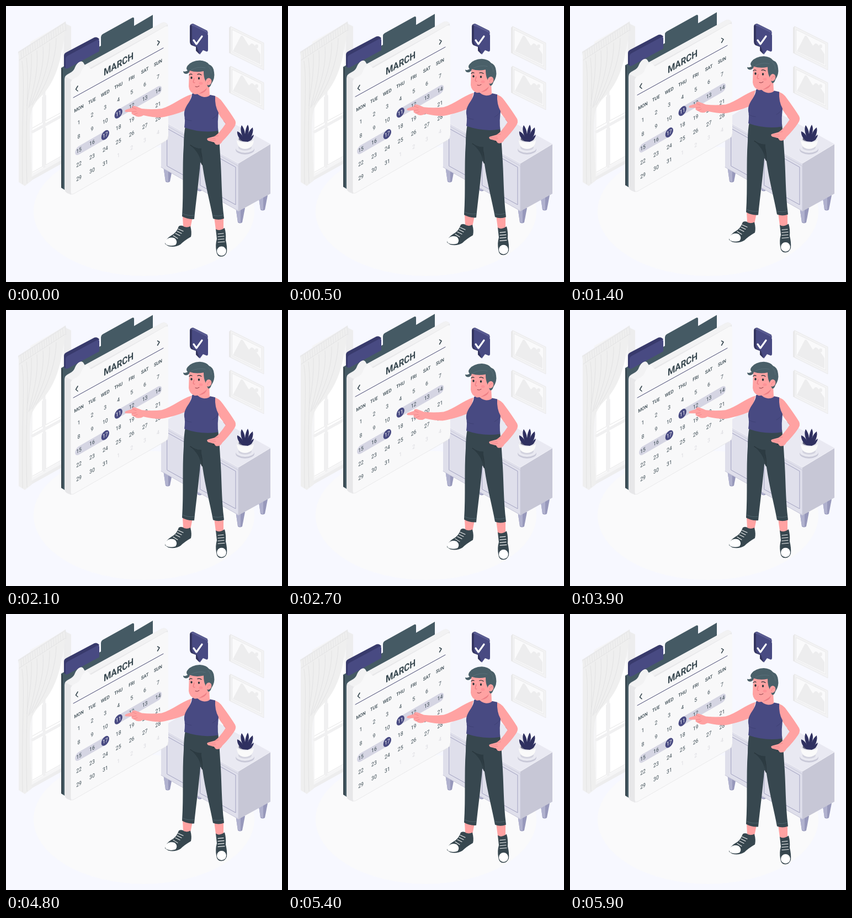
Write an HTML page with a canvas that moves like this. It is 500 px wide and 500 px high and loops after 6000 ms.

```html
<!DOCTYPE html>
<html lang="en">
<head>
<meta charset="utf-8">
<title>Calendar planning</title>
<style>
html, body { margin: 0; width: 100%; height: 100%; overflow: hidden; background: #f7f8ff; }
canvas { display: block; width: 500px; height: 500px; }
</style>
</head>
<body>
<canvas id="stage" width="500" height="500"></canvas>
<script>
const ctx = document.getElementById('stage').getContext('2d');
const NAVY = '#484a82', DEEP = '#34355f', SLATE = '#37474f', STEEL = '#455a64';
const SKIN = '#ffa2a2', SKIN_DARK = '#ed8086', FONT = 'Roboto, sans-serif';

function fill(color, d) {
  ctx.fillStyle = color;
  ctx.fill(new Path2D(d));
}
function line(color, width, d) {
  ctx.strokeStyle = color;
  ctx.lineWidth = width;
  ctx.stroke(new Path2D(d));
}
function oval(color, x, y, rx, ry, turn = 0) {
  ctx.fillStyle = color;
  ctx.beginPath();
  ctx.ellipse(x, y, rx, ry, turn, 0, Math.PI * 2);
  ctx.fill();
}
function shifted(x, y, draw) {
  ctx.save();
  ctx.translate(x, y);
  draw();
  ctx.restore();
}
// Plane of the calendar face: x runs up to the right, y straight down.
function onFace(x, y, draw) {
  shifted(x, y, () => {
    ctx.transform(.866, -.5, 0, 1, 0, 0);
    draw();
  });
}
function label(text, x, y, size, weight, color) {
  ctx.font = `${weight} ${size}px ${FONT}`;
  ctx.fillStyle = color;
  ctx.fillText(text, x, y);
}

function drawWindow() {
  fill('#ededee', 'M46 66L106 31L118 37V276L46 316Z');
  fill('#f5f5f6', 'M44 65L106 30V276L44 311Z');
  fill('#fff', 'M48 70L102 40V272L48 303Z');
  line('#f0f0f1', 5, 'M69 60V291M48 228L103 198');
  line('#e6e6e7', 1, 'M66 165V211L48 221M72 162V208L102 192M66 224V291L48 301M72 221V288L102 271');
  line('#e9e9ea', 1, 'M106 40V276M102 120V272');
  fill('#e9e9ea', 'M22 83L108 28L110 44L24 98Z');
  fill('#efefef', 'M23 85L106 32C109 48 104 66 101 82C96 112 84 143 66 161C53 174 45 185 44 203C42 238 46 279 47 316L34 326L23 319Z');
  line('#e3e3e4', 1, 'M24 98L107 44M29 100C35 142 28 194 30 322M37 94C43 145 34 195 38 321M46 87C47 133 39 162 38 181M56 81C59 119 49 151 41 184M67 74C70 110 57 148 43 182M79 67C80 102 66 143 47 179M91 59C90 98 75 140 54 171');
  for (let x = 27; x < 106; x += 4.2) {
    const y = 82 - (x - 27) * .64;
    line('#e4e4e5', .8, `M${x} ${y}L${x + 1} ${y + 13}`);
  }
}

function drawPicture() {
  fill('#e9e9ea', 'M404 39L407 37L467 67V116L464 114L404 85Z');
  fill('#f3f3f4', 'M407 37L467 67V116L407 86Z');
  fill('#fafafb', 'M410 43L463 69V109L410 83Z');
  fill('#ededee', 'M411 82L425 55Q427 52 430 56L440 72L444 68Q447 67 450 71L461 87V106Z');
  oval('#ededee', 454, 73, 3, 3.5);
  line('#e7e7e9', .8, 'M407 37L467 67V116L407 86ZM410 43L463 69V109L410 83Z');
}

function drawBubble() {
  fill(DEEP, 'M333 37Q333 33 338 32L341 33L365 45V80L355 79L350 87L344 81V74L336 71Q333 69 333 64Z');
  fill('#5a5c92', 'M335 34L339 32L363 44Q366 46 366 50L361 49L338 37Z');
  fill(NAVY, 'M337 39Q337 35 341 37L363 48Q366 50 366 54V79Q366 84 362 82L357 80L351 88L346 74L340 71Q337 69 337 65Z');
  line('#fff', 3.2, 'M340 62L345 69L355 55');
}

function drawCabinet() {
  const leg = (x, y) => shifted(x, y, () => {
    fill('#9798bb', 'M-8 -7L9 -5L4 21Q0 24 -4 21Z');
    fill('#b0b1ce', 'M-8 -7L1 -3V22L-4 20Z');
  });
  leg(293, 297);
  leg(351, 313);
  leg(465, 348);
  leg(424, 371);
  fill('#dfdfeb', 'M281 206L421 285V372L281 292Z');
  fill('#c7c7d6', 'M421 285L479 250V340L421 372Z');
  fill('#e9e9f2', 'M281 206L337 171L479 250L421 285Z');
  line('#f0f0f6', 1, 'M281 206L421 285L479 250');
  line('#c9c9da', 1, 'M281 211L421 290V371L281 292');
  line('#a1a1c0', 1, 'M292 222L346 252V320L292 290ZM352 256L416 292V360L352 325Z');
}

function drawPlant() {
  oval('#c9c9d8', 433, 260, 17, 9);
  oval('#e9e9f1', 433, 257, 17, 9);
  oval('#d3d3df', 433, 256, 12, 6);
  fill('#fafafa', 'M418 241Q418 253 425 257Q433 261 441 257Q449 253 449 241Z');
  oval('#e7e7ee', 433.5, 241, 15.5, 6.5);
  oval('#66677f', 433.5, 241, 12, 4.6);
  fill('#2f3060', 'M429 245C422 241 418 233 419 227Q426 230 429 237C424 227 425 219 427 216Q432 222 433 232Q434 221 438 215Q442 222 438 233Q441 224 447 220Q449 229 443 239Q445 235 449 233Q448 242 438 246Z');
}

function drawDates() {
  const step = 27.6, row = 25.2;
  const days = ['MON', 'TUE', 'WED', 'THU', 'FRI', 'SAT', 'SUN'];
  const pill = (from, to, y) => {
    ctx.fillStyle = '#d5d5e3';
    ctx.beginPath();
    ctx.roundRect(from * step - 8, y * row - 7.6, (to - from) * step + 16, 15.2, 7.6);
    ctx.fill();
  };
  onFace(132, 211, () => {
    pill(3, 6, 1);
    pill(0, 2, 2);
    oval(NAVY, 3 * step, row, 8.3, 8);
    oval(NAVY, 2 * step, 2 * row, 8.3, 8);
    days.forEach((day, i) => label(day, i * step, -25, 8.7, 500, SLATE));
    for (let i = 0; i < 35; i++) {
      const day = i < 31 ? i + 1 : i - 30;
      const color = i > 30 ? '#d9d9de' : day === 11 || day === 17 ? '#fff' : SLATE;
      label(day, i % 7 * step, Math.floor(i / 7) * row + .5, 10, 400, color);
    }
  });
}

function drawCalendar() {
  fill(STEEL, 'M100 112L172 72V56Q172 53 175 51L229 21Q232 20 232 23V36L266 16V60L114 150V328L106 333L100 329Z');
  fill(SLATE, 'M100 112L103 114V331L100 329Z');
  fill('#383a6c', 'M105 111V90Q105 86 109 84L160 57Q165 55 169 60L164 67L111 93L109 113Z');
  fill(NAVY, 'M108 114V96Q108 92 112 90L164 62Q169 59 169 64V82L112 113Z');
  fill('#e7e7e9', 'M106 133Q106 127 111 124L118 120Q123 117 125 111Q128 104 134 101Q139 99 141 104L143 107L283 30Q289 28 293 34L294 60L140 160L118 342L111 339Q106 336 106 331Z');
  fill('#f2f2f3', 'M107 128L119 120Q124 116 126 110Q129 103 134 101Q139 99 142 107L283 30Q289 28 293 34L151 113L145 114L135 124L120 134Z');
  fill('#f8f8f9', 'M117 141Q117 135 122 132L129 128Q134 125 136 119Q139 111 145 108Q149 107 151 112L154 114L287 38Q294 34 294 41V236Q294 241 290 244L123 340Q117 343 117 337Z');
  line('#e2e2e4', .7, 'M294 236Q294 241 290 244L123 340Q117 343 117 337V141');
  line('#43456f', 1, 'M122 166L285 76');
  line(SLATE, 1.6, 'M130 145L126.5 151L130 154M274.5 63L278 65L274.5 71');
  onFace(204, 106, () => label('MARCH', 0, 0, 17.6, 700, SLATE));
  drawDates();
}

function drawShoes() {
  fill(SKIN, 'M320 380L338 383L334 402Q327 405 321 399ZM377 382H394V406Q386 410 380 405Z');
  shifted(0, -3, () => {
    fill(SLATE, 'M313 402Q318 399 323 403Q329 405 334 402Q337 413 335 421Q323 428 316 435Q306 441 294 438L288 434Q290 424 299 419Q309 414 313 402Z');
    fill('#fff', 'M290 427Q297 420 306 424Q312 430 307 436Q297 439 290 435Q287 432 290 427Z');
    line('#f4f4f4', 1.1, 'M312 407L321 411M310 411L318 415M307 415L315 419M303 419L311 424');
  });
  fill(SLATE, 'M380 404Q386 409 396 402Q399 412 398 424Q401 436 400 446Q397 454 390 454Q382 454 381 444Q379 432 382 422Z');
  oval('#fff', 390.5, 444, 8.5, 8.5);
  line('#f4f4f4', 1.1, 'M384 413L394 412M384 418L395 417M384 423L395 422M384 428L396 427');
}

function drawTrousers() {
  fill(SLATE, 'M325 217L384 221Q387 246 388 270C391 306 390 346 395 385Q385 389 375 385C370 357 361 325 356 289L352 283C349 321 344 355 341 386Q329 387 319 381C322 337 319 294 322 252Q322 232 325 217Z');
  line('#263238', 1.1, 'M334 252Q343 259 353 259M352 259Q356 274 355 287M383 231Q382 240 375 249');
  fill('#2c3b42', 'M334 252Q344 259 354 258L353 284Q352 268 334 252Z');
  line('#546a73', .8, 'M320 376Q330 381 341 379M374 379Q385 382 394 378');
}

function drawArms() {
  fill(SKIN, 'M336 160C317 166 302 180 282 186Q264 188 246 186Q239 183 233 181Q227 181 229 184L217 188Q213 191 218 192L228 192Q226 196 231 197L236 200Q243 202 249 198Q266 202 280 202C300 199 319 192 330 187Z');
  line(SKIN_DARK, .8, 'M229 184L236 187M228 192L236 191M231 197L238 194');
  fill(SKIN, 'M374 162Q386 164 393 175Q407 194 415 207Q418 213 413 220C407 229 399 238 392 245Q388 253 380 251L377 247L366 244Q362 240 367 239L378 236Q387 230 398 213Q389 202 382 191Z');
  line(SKIN_DARK, .8, 'M367 241L379 240M370 244L380 243M378 236L385 235M398 213L394 208');
}

function drawTorso() {
  fill(SKIN, 'M350 147L368 141L369 161L377 164L373 179L342 176L336 161L349 158Z');
  fill(SKIN_DARK, 'M350 156Q359 155 364 148Q363 157 350 159Z');
  fill(NAVY, 'M337 159L344 156Q350 164 359 165Q367 165 370 161L379 163Q378 181 385 193Q383 209 384 226Q354 231 323 220Q325 206 323 198C322 180 336 175 337 159Z');
  line('#3c3e70', .7, 'M384 195Q379 202 374 204M324 204Q330 208 336 208');
}

function drawHead() {
  fill(SKIN, 'M332 114L331 146Q332 156 342 160Q352 160 361 150L370 142L368 120L350 109Z');
  fill('#4a6069', 'M321 118Q321 123 327 123Q332 122 333 117Q344 121 358 118Q358 129 361 135L366 147Q370 148 372 141Q379 131 377 120Q376 109 368 106Q363 99 351 98.5Q336 99 329 108Q325 113 329 117Q324 120 321 118Z');
  line('#5c727b', .8, 'M335 116Q346 109 361 112M366 109Q372 114 372 122');
  oval(SKIN, 367, 137, 5.3, 6.5, .25);
  line(SKIN_DARK, .9, 'M365 140Q366 134 370 135');
  oval('#fd9398', 353, 140, 3.5, 2.5);
  oval('#263238', 336, 130, 1.6, 2.2);
  oval('#263238', 349.5, 131, 1.6, 2.2);
  line('#263238', 1.2, 'M332 125Q334 122 337 124M347 124Q350 122 354 125');
  line('#e66c75', 1, 'M341 131L339 138Q340 140 342 139');
  line('#8f3d47', 1, 'M343 146Q346 148 350 145');
}

function drawPerson() {
  drawShoes();
  drawTrousers();
  drawArms();
  drawTorso();
  drawHead();
}

// Rises from 0 to 1 and falls back at constant speed.
function bounce(time, period) {
  const phase = time % period / period;
  return 1 - Math.abs(2 * phase - 1);
}

function frame(now) {
  const time = Math.floor(now % 6000 / 100) * 100;
  ctx.textAlign = 'center';
  ctx.textBaseline = 'middle';
  ctx.lineCap = ctx.lineJoin = 'round';
  ctx.fillStyle = '#f7f8ff';
  ctx.fillRect(0, 0, 500, 500);
  oval('#fafafb', 250, 372, 200, 117);
  drawWindow();
  drawPicture();
  shifted(0, 72, drawPicture);
  drawBubble();
  drawCabinet();
  drawPlant();
  shifted(0, -10 * bounce(time, 6000), drawCalendar);
  shifted(0, -8 * bounce(time, 3000), drawPerson);
  requestAnimationFrame(frame);
}
requestAnimationFrame(frame);
</script>
</body>
</html>
```
